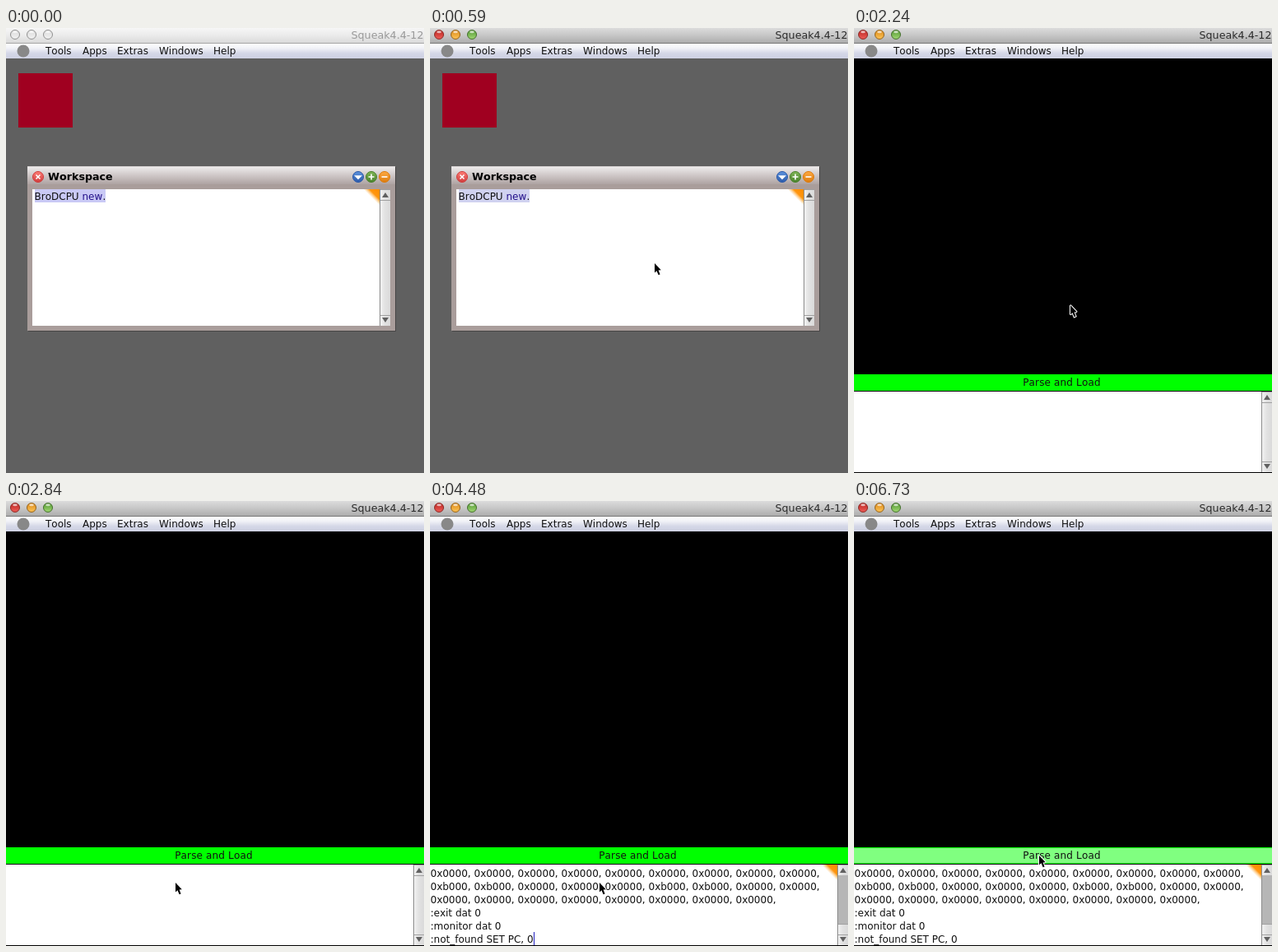
Write an HTML page with a canvas that moves like this. It is 508 by 541 pixels and loops after 8 s.

```html
<!DOCTYPE html>
<html lang="en">
<head>
<meta charset="utf-8">
<title>Workspace</title>
<style>
html, body { margin: 0; width: 100%; height: 100%; overflow: hidden; background: #606060; }
canvas { display: block; }
</style>
</head>
<body>
<canvas id="stage" width="508" height="541"></canvas>
<script>
const W = 508, H = 541, LOOP = 8000;
const ctx = document.getElementById('stage').getContext('2d');
const FONT = '"DejaVu Sans", sans-serif';
const UI = '12px ' + FONT;

// start time, tip x, tip y
const POINTER = [
  [150, 410, 340], [300, 278, 288], [450, 273, 286],
  [2240, 263, 337], [2390, 229, 407], [2540, 213, 438],
  [2690, 206, 461], [2840, 206, 464], [4930, 216, 455],
  [5080, 223, 440], [5230, 224, 435], [5380, 224, 432], [5530, 225, 431]
];
const ARROW = [[0, 0], [0, 11.5], [2.5, 9.3], [4.6, 14.3], [6.6, 13.4], [4.6, 8.6], [7.8, 8.2]];

function rect(x, y, w, h, fill) {
  ctx.fillStyle = fill;
  ctx.fillRect(x, y, w, h);
}

function ramp(x0, y0, x1, y1, ...stops) {
  const g = ctx.createLinearGradient(x0, y0, x1, y1);
  stops.forEach((c, i) => g.addColorStop(i / (stops.length - 1), c));
  return g;
}

function text(s, x, y, color = '#111', font = UI, spacing = 0) {
  ctx.font = font;
  ctx.fontKerning = 'none';
  ctx.letterSpacing = spacing + 'px';
  ctx.fillStyle = color;
  ctx.fillText(s, x, y);
}

function poly(points, fill) {
  ctx.beginPath();
  points.forEach(([x, y]) => ctx.lineTo(x, y));
  ctx.closePath();
  if (fill) {
    ctx.fillStyle = fill;
    ctx.fill();
  }
}

function disc(x, y, r, fill, edge) {
  ctx.beginPath();
  ctx.arc(x, y, r, 0, Math.PI * 2);
  ctx.fillStyle = fill;
  ctx.fill();
  if (edge) {
    ctx.strokeStyle = edge;
    ctx.lineWidth = 1;
    ctx.stroke();
  }
}

function titleBar(active) {
  rect(0, 0, W, 18, active
    ? ramp(0, 0, 0, 18, '#dcdcdc', '#c6c6c6', '#adadad')
    : ramp(0, 0, 0, 18, '#f6f6f6', '#ebebeb', '#dadada'));
  rect(0, 18, W, 1, active ? '#777' : '#a5a5a5');
  const lights = active
    ? [['#b8231f', '#f2605a', '#8c2a26'], ['#d98616', '#ffc75a', '#94631c'], ['#4f9430', '#a5dc76', '#456f2e']]
    : Array(3).fill(['#dadada', '#f2f2f2', '#909090']);
  lights.forEach(([top, bottom, edge], i) => {
    const x = 11 + i * 20;
    disc(x, 8, 5.5, ramp(0, 2, 0, 14, top, bottom), edge);
    ctx.beginPath();
    ctx.ellipse(x, 4.8, 2.8, 1.5, 0, 0, Math.PI * 2);
    ctx.fillStyle = 'rgba(255,255,255,.65)';
    ctx.fill();
  });
  text('Squeak4.4-12', 419.5, 13, active ? '#2b2b2b' : '#999', '12.7px ' + FONT);
}

function menuBar() {
  rect(0, 19, W, 18, ramp(0, 19, 0, 37, '#ffffff', '#eff0f6', '#d3d6e6', '#cfd2e3'));
  disc(21, 28, 7.5, '#888');
  [['Tools', 48], ['Apps', 93], ['Extras', 135], ['Windows', 186], ['Help', 252]]
    .forEach(([s, x]) => text(s, x, 32));
}

function corner(right, top) {
  const g = ctx.createLinearGradient(right, top, right - 10, top + 10);
  g.addColorStop(0, '#ff8c00');
  g.addColorStop(.62, '#ff950f');
  g.addColorStop(1, 'rgba(255,190,100,0)');
  ctx.fillStyle = g;
  ctx.fillRect(right - 20, top, 20, 20);
}

function scrollBar(x, top, bottom, thumbTop) {
  rect(x, top, 13, bottom - top, '#b6b6b6');
  const part = (y, h) => {
    rect(x, y, 13, h, '#a0a0a0');
    rect(x + 1, y + 1, 12, h - 1, ramp(x, 0, x + 13, 0, '#f4f4f4', '#e2e2e2', '#dadada'));
  };
  part(top, 13);
  part(thumbTop, bottom - 13 - thumbTop);
  part(bottom - 13, 13);
  const mid = x + 7, up = top + 4, down = bottom - 4;
  poly([[mid - 4, up + 6], [mid + 4, up + 6], [mid, up]], '#606060');
  poly([[mid - 4, down - 6], [mid + 4, down - 6], [mid, down]], '#606060');
  rect(x, top, 1, bottom - top, '#8c8c8c');
}

function windowButton(x, dark, light, drawMark) {
  disc(x, 181, 6.5, ramp(0, 174, 0, 188, light, dark), dark);
  ctx.strokeStyle = ctx.fillStyle = '#fff';
  ctx.lineWidth = 1.6;
  ctx.beginPath();
  drawMark(x, 181);
  ctx.stroke();
}

function line(x0, y0, x1, y1) {
  ctx.moveTo(x0, y0);
  ctx.lineTo(x1, y1);
}

function workspace(active) {
  rect(0, 37, W, H - 37, '#606060');
  rect(15, 55, 66, 66, '#a00020');

  rect(27, 169, 447, 200, '#484646');
  rect(26, 168, 447, 200, '#a99d9b');
  rect(26, 168, 447, 22, ramp(0, 168, 0, 190, '#f0eeee', '#cfc8c8', '#aea3a2'));
  rect(26, 168, 447, 1, '#d8d4d4');
  text('Workspace', 51, 185, '#000', 'bold 12.7px ' + FONT);

  windowButton(39, '#cf3a3a', '#ff8078', (x, y) => {
    line(x - 2.5, y - 2.5, x + 2.5, y + 2.5);
    line(x + 2.5, y - 2.5, x - 2.5, y + 2.5);
  });
  windowButton(428, '#2a58a8', '#5f95e0', (x, y) => {
    poly([[x - 3, y - 1], [x + 3, y - 1], [x, y + 2]], '#fff');
  });
  windowButton(444, '#47802a', '#82b858', (x, y) => {
    line(x - 3.5, y, x + 3.5, y);
    line(x, y - 3.5, x, y + 3.5);
  });
  windowButton(460, '#dc7a0c', '#ffab45', (x, y) => line(x - 3.5, y, x + 3.5, y));

  rect(32, 196, 422, 166, '#fff');
  corner(454, 196);
  scrollBar(454, 196, 362, 209);
  rect(35, 196, 86, 16, active ? '#d0d2f0' : '#c9c9f5');
  text('BroDCPU ', 34.5, 209);
  text('new', 34.5 + ctx.measureText('BroDCPU ').width, 209, '#23108a');
  text('.', 117.5, 209);
}

function listing() {
  const rows = [[9, []], [9, [0, 1, 5, 6]], [8, []]];
  rows.forEach(([count, marked], r) => {
    for (let i = 0; i < count; i++) {
      text(marked.includes(i) ? '0xb000,' : '0x0000,', .5 + i * 53, 457 + r * 16);
    }
  });
  [':exit dat 0', ':monitor dat 0', ':not_found SET PC, 0']
    .forEach((s, i) => text(s, .5, 505 + i * 16));
}

function emulator(t) {
  const loaded = t >= 4480;
  rect(0, 37, W, H - 37, '#000');
  rect(0, 421, W, 20, '#00ff00');
  if (t >= 6730) rect(0, 422, W, 18, '#80ff80');
  text('Parse and Load', 205.2, 435, '#111', UI, .15);

  rect(0, 442, W, 98, '#fff');
  if (loaded) {
    corner(495, 442);
    listing();
    if (t < 5230) rect(126, 524, 1, 16, '#2020c0');
  } else if (t >= 3440 && t < 4030) {
    rect(1, 442, 1, 12, '#2020c0');
  }
  scrollBar(495, 442, 540, loaded ? 514 : 455);
}

function pointer(t) {
  const step = POINTER.filter(p => p[0] <= t).pop();
  if (!step) return;
  ctx.save();
  ctx.translate(step[1], step[2]);
  poly(ARROW);
  ctx.lineJoin = 'miter';
  ctx.miterLimit = 2;
  ctx.lineWidth = 2;
  ctx.strokeStyle = '#fff';
  ctx.stroke();
  ctx.fillStyle = '#000';
  ctx.fill();
  ctx.restore();
}

function draw(t) {
  const active = t >= 590;
  if (t < 1490) workspace(active);
  else emulator(t);
  titleBar(active);
  menuBar();
  pointer(t);
}

let start;
function tick(now) {
  start ??= now;
  draw((now - start) % LOOP);
  requestAnimationFrame(tick);
}
draw(0);
requestAnimationFrame(tick);
</script>
</body>
</html>
```
